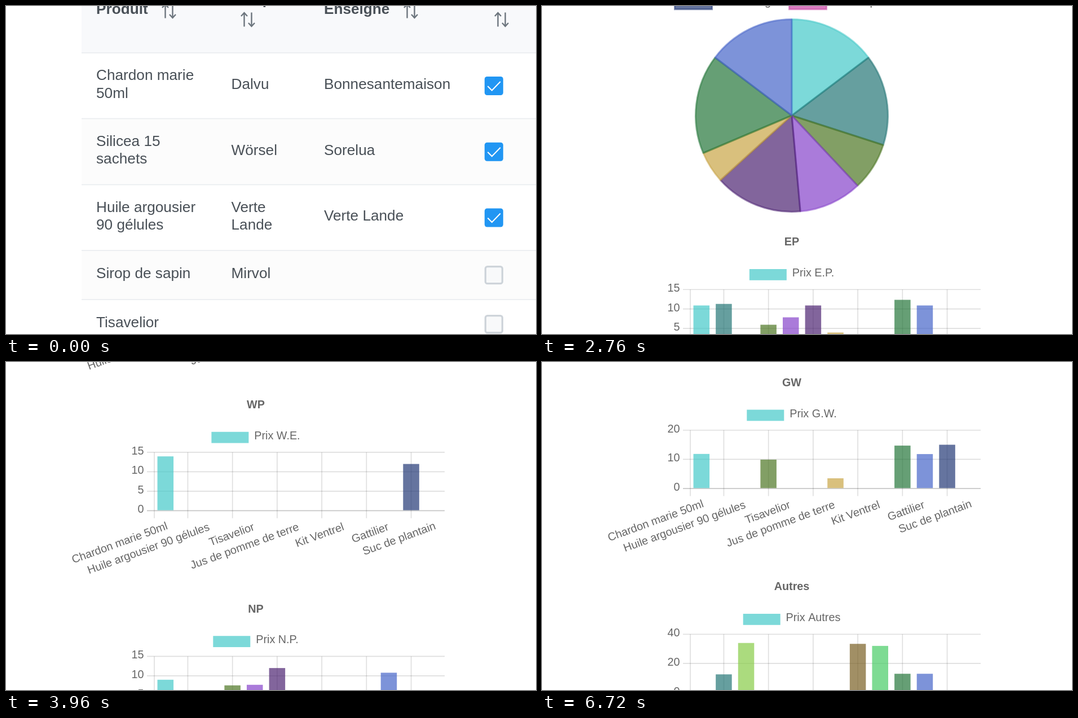
Animation, 940 px wide and 581 px high, one loop 7000 ms. Source, as an HTML page with a canvas:

```html
<!DOCTYPE html>
<html lang="fr">
<head>
<meta charset="utf-8">
<title>Comparateur de prix</title>
<style>
  html, body { margin: 0; width: 100%; height: 100%; overflow: hidden; background: #fff; }
  canvas { display: block; }
</style>
</head>
<body>
<canvas id="stage" width="940" height="581"></canvas>
<script>
const ctx = document.getElementById('stage').getContext('2d');
const LOOP = 7000, STEP = 40, CHARTS_AT = 200;
const FONT = '"Liberation Sans", Arial, sans-serif';
const COLORS = ['#45c9c9', '#267777', '#88cc48', '#4e7724', '#8744ca', '#4e2473', '#c9a547',
                '#796024', '#48cc65', '#26773b', '#4765c9', '#243a77', '#c947a5'];

// ---- helpers ----
function text(s, x, y, size, color, { bold = false, align = 'left' } = {}) {
  ctx.font = `${bold ? 'bold ' : ''}${size}px ${FONT}`;
  ctx.textAlign = align;
  ctx.textBaseline = 'middle';
  ctx.fillStyle = color;
  ctx.fillText(s, x, y);
}

function rect(x, y, w, h, color) {
  ctx.fillStyle = color;
  ctx.fillRect(x, y, w, h);
}

function path(points, color, width) {
  ctx.beginPath();
  points.forEach(([x, y]) => ctx.lineTo(x, y));
  ctx.strokeStyle = color;
  ctx.lineWidth = width;
  ctx.stroke();
}

// Monotone cubic through [time, value] keys
function track(keys, t) {
  const last = keys.length - 1;
  if (t <= keys[0][0]) return keys[0][1];
  if (t >= keys[last][0]) return keys[last][1];
  const i = keys.findIndex(k => k[0] > t) - 1;
  const slope = j => (keys[j + 1][1] - keys[j][1]) / (keys[j + 1][0] - keys[j][0]);
  const tangent = j => {
    if (j === 0 || j === last) return 0;
    const a = slope(j - 1), b = slope(j);
    return a * b > 0 ? 2 * a * b / (a + b) : 0;
  };
  const [t0, v0] = keys[i], [t1, v1] = keys[i + 1];
  const h = t1 - t0, u = (t - t0) / h;
  return v0 * (1 + 2 * u) * (1 - u) ** 2 + h * tangent(i) * u * (1 - u) ** 2
       + v1 * u * u * (3 - 2 * u) + h * tangent(i + 1) * u * u * (u - 1);
}

// ---- table ----
const INK = '#495057';
const ROWS = [
  [83, ['Chardon marie', '50ml'], ['Dalvu'], 'Bonnesantemaison', true],
  [199.5, ['Silicea 15', 'sachets'], ['Wörsel'], 'Sorelua', true],
  [316.5, ['Huile argousier', '90 gélules'], ['Verte', 'Lande'], 'Verte Lande', true],
  [433, ['Sirop de sapin'], ['Mirvol'], '', false],
  [520, ['Tisavelior'], [], '', false],
  [607]
];

function sortIcon(x, y) {
  for (const d of [-1, 1]) {
    const cx = x + d * 6.5, tip = y + d * 12;
    path([[cx, y - d * 12.5], [cx, tip]], '#6c757d', 2.4);
    path([[cx - 5.5, tip - d * 6], [cx, tip], [cx + 5.5, tip - d * 6]], '#6c757d', 2.4);
  }
}

function checkbox(x, y, on) {
  ctx.beginPath();
  if (on) {
    ctx.roundRect(x - 16.5, y - 16.5, 33, 33, 4.5);
    ctx.fillStyle = '#2196f3';
    ctx.fill();
    path([[x - 11, y + 0.5], [x - 3.5, y + 8], [x + 11.5, y - 7.5]], '#fff', 2);
  } else {
    ctx.roundRect(x - 15, y - 15, 30, 30, 3.5);
    ctx.fillStyle = '#f8f9fa';
    ctx.fill();
    ctx.strokeStyle = '#ced4da';
    ctx.lineWidth = 3.3;
    ctx.stroke();
  }
}

function drawTable() {
  const cell = (lines, x, y) => lines.forEach((s, i) =>
    text(s, x, y - 1.5 + (i - (lines.length - 1) / 2) * 31.4, 26.2, INK));
  rect(134, 0, 806, 83, '#f8f9fb');
  text('Produit', 160, 7, 26.2, INK, { bold: true });
  text('Marque', 399.5, -10, 26.2, INK, { bold: true });
  text('Enseigne', 564, 7, 26.2, INK, { bold: true });
  [[289, 9], [429, 24], [718, 9], [879, 24]].forEach(p => sortIcon(...p));
  ROWS.slice(0, -1).forEach(([top, product, brand, shop, on], i) => {
    const bottom = ROWS[i + 1][0], mid = (top + bottom) / 2;
    if (i % 2) rect(134, top, 806, bottom - top, '#fcfcfc');
    rect(134, top - 0.8, 806, 1.6, '#e9ecef');
    cell(product, 160, mid);
    cell(brand, 399.5, mid);
    cell([shop], 564, mid);
    checkbox(865.3, mid + 0.2, on);
  });
}

// ---- charts ----
const GRAY = '#666', SIZE = 19.8, PITCH = 361.5, FIRST = 432.5;
const LEFT = 263, RIGHT = 778, SLOT = (RIGHT - LEFT) / 13;
// Every second category is named: [label, shift along its slanted line]
const LABELS = [['Chardon marie 50ml', 3.5], ['Huile argousier 90 gélules', -1.8], ['Tisavelior', -1.5],
                ['Jus de pomme de terre', -1.5], ['Kit Ventrel', -1], ['Gattilier', -1], ['Suc de plantain', 3.5]];
const CHARTS = [
  { title: 'EP', legend: 'Prix E.P.', max: 15, step: 5,
    bars: { 0: 10.9, 1: 11.3, 3: 5.95, 4: 7.85, 5: 10.9, 6: 3.95, 9: 12.35, 10: 10.9 } },
  { title: 'WP', legend: 'Prix W.E.', max: 15, step: 5, bars: { 0: 13.95, 11: 12 } },
  { title: 'NP', legend: 'Prix N.P.', max: 15, step: 5, bars: { 0: 9, 3: 7.55, 4: 7.7, 5: 12, 10: 10.8 } },
  { title: 'GW', legend: 'Prix G.W.', max: 20, step: 10,
    bars: { 0: 11.85, 3: 9.9, 6: 3.5, 9: 14.7, 10: 11.8, 11: 15 } },
  { title: 'Autres', legend: 'Prix Autres', max: 40, step: 20,
    bars: { 1: 12.5, 2: 34, 7: 33.4, 8: 32, 9: 12.9, 10: 12.9 } }
];

function tinted(x, y, w, h, i) {
  ctx.globalAlpha = 0.7;
  rect(x, y, w, h, COLORS[i]);
  ctx.globalAlpha = 1;
}

function pieLegend(label, x, y, i) {
  tinted(x, y, 66, 19.8, i);
  ctx.globalAlpha = 0.55;
  ctx.strokeStyle = COLORS[i];
  ctx.lineWidth = 3;
  ctx.strokeRect(x, y, 66, 19.8);
  ctx.globalAlpha = 1;
  text(label, x + 75.9, y + 7.8, SIZE, GRAY);
}

function drawPie(cy, grow) {
  const parts = Object.entries(CHARTS[0].bars);
  const total = parts.reduce((sum, [, v]) => sum + v, 0);
  let from = -Math.PI / 2;
  pieLegend('Huile onagre', 235.5, cy - 208, 11);
  pieLegend('Suc de plantain', 438.5, cy - 208, 12);
  ctx.lineJoin = 'bevel';
  ctx.lineWidth = 3;
  for (const [i, v] of parts) {
    const to = from + v / total * 2 * Math.PI * grow;
    ctx.beginPath();
    ctx.arc(443, cy, 170.5, from, to);
    ctx.lineTo(443, cy);
    ctx.closePath();
    ctx.fillStyle = ctx.strokeStyle = COLORS[i];
    ctx.globalAlpha = 0.7;
    ctx.fill();
    ctx.globalAlpha = 0.55;
    if (grow) ctx.stroke();
    from = to;
  }
  ctx.lineJoin = 'miter';
  ctx.globalAlpha = 1;
}

function drawBars({ title, legend, max, step, bars }, y, grow) {
  const top = y + 83.2, zero = y + 186.6, unit = (zero - top) / max;
  text(title, 443, y, SIZE, GRAY, { bold: true, align: 'center' });

  ctx.font = `${SIZE}px ${FONT}`;
  const box = 443 - (75.9 + ctx.measureText(legend).width) / 2;
  tinted(box, y + 47, 66, 19.8, 0);
  text(legend, box + 75.9, y + 54.7, SIZE, GRAY);

  for (let v = 0; v <= max; v += step) {
    const gy = zero - v * unit;
    path([[250, gy], [RIGHT, gy]], v ? 'rgba(0,0,0,.13)' : 'rgba(0,0,0,.22)', 1.65);
    text(v, 244.5, gy - 1.5, SIZE, GRAY, { align: 'right' });
  }
  for (let i = 0; i < 7; i++) {
    const gx = i ? LEFT + (2 * i - 0.5) * SLOT : LEFT;
    path([[gx, top], [gx, y + 200]], 'rgba(0,0,0,.13)', 1.65);
  }
  for (const [i, v] of Object.entries(bars)) {
    const h = v * unit * grow;
    tinted(LEFT + (+i + 0.14) * SLOT, zero - h, SLOT * 0.72, Math.max(0, h - 0.8), i);
  }
  LABELS.forEach(([label, shift], i) => {
    ctx.save();
    ctx.translate(LEFT + (2 * i + 0.5) * SLOT, y + 214.9);
    ctx.rotate(-20 * Math.PI / 180);
    text(label, shift, 0, SIZE, GRAY, { align: 'right' });
    ctx.restore();
  });
}

const SCROLL = [[2720, 0], [2760, 13.5], [3520, 497], [4000, 720], [4200, 720], [4520, 980],
                [5000, 1250], [5160, 1250], [5320, 1338.5], [5560, 1479.5]];

function drawCharts(t) {
  const left = 1 - Math.min(1, Math.max(0, (t - 217) / 1000));
  const grow = 1 - left ** 4;
  const scroll = track(SCROLL, t);
  if (scroll < 400) drawPie(207.5 - scroll, grow);
  CHARTS.forEach((chart, i) => {
    const y = FIRST + i * PITCH - scroll;
    if (y > -320 && y < 600) drawBars(chart, y, grow);
  });
}

// ---- pointer ----
const POINTER_X = [[6040, 550], [6120, 339], [6280, 339], [6440, 142], [6560, 142], [6680, 107]];
const POINTER_Y = [[6040, 392], [6120, 280], [6280, 280], [6440, 30], [6560, 30], [6680, -12]];
const ARROW = [[1, 1], [1, 21], [5.5, 17], [9, 25], [12, 23.5], [8.8, 16], [15, 15.5]];

function drawPointer(t) {
  if (t < 6040 || t >= 6720) return;
  const x = track(POINTER_X, t), y = track(POINTER_Y, t);
  ctx.beginPath();
  ARROW.forEach(([px, py]) => ctx.lineTo(x + px, y + py));
  ctx.closePath();
  ctx.fillStyle = '#000';
  ctx.strokeStyle = '#fff';
  ctx.lineWidth = 1.5;
  ctx.fill();
  ctx.stroke();
}

const start = performance.now();
function frame() {
  const t = Math.floor((performance.now() - start) % LOOP / STEP) * STEP;
  rect(0, 0, 940, 581, '#fff');
  if (t < CHARTS_AT) drawTable();
  else drawCharts(t);
  drawPointer(t);
  requestAnimationFrame(frame);
}
frame();
</script>
</body>
</html>
```
